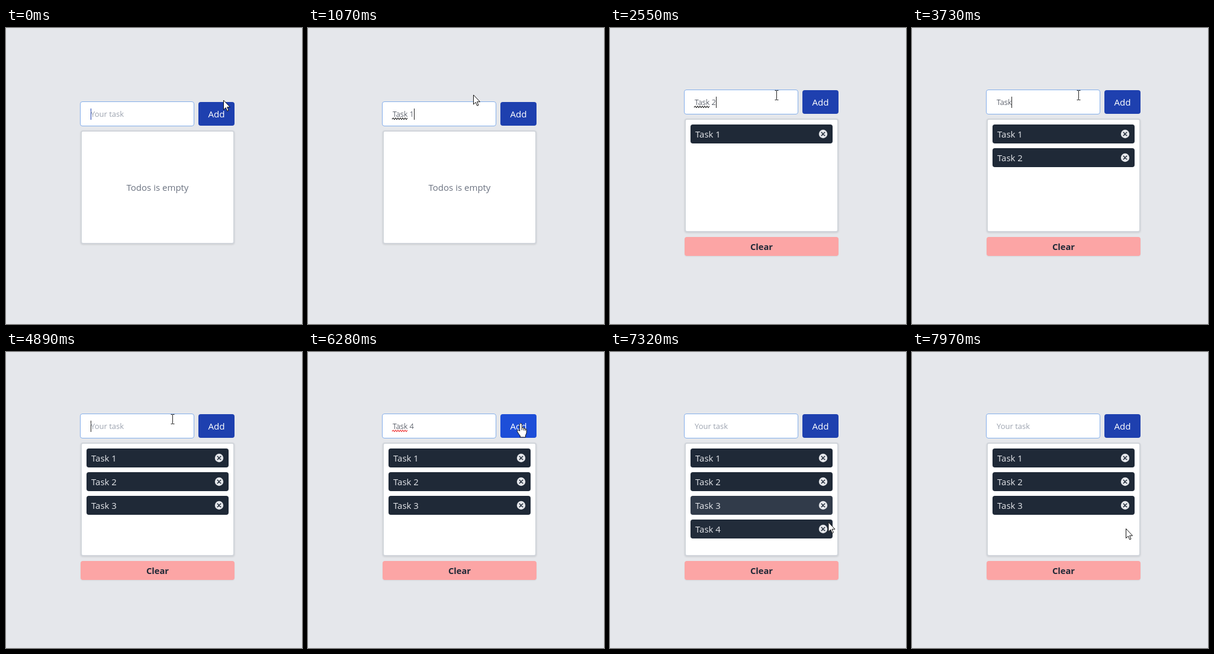
Write an HTML page that moves like this. It is 500 px wide and 500 px high and loops after 8 s.

```html
<!DOCTYPE html>
<html lang="en">
<head>
<meta charset="utf-8">
<title>Todo list</title>
<style>
  html, body { margin: 0; width: 100%; height: 100%; overflow: hidden; background: #e5e7eb; }
  #stage { position: relative; width: 500px; height: 500px; overflow: hidden; font: 15px/32px "Open Sans", "Noto Sans", sans-serif; }
  #stage div, #stage svg { position: absolute; box-sizing: border-box; }
  #app { left: 126px; top: 125px; width: 260px; height: 280px; }
  #field { left: -1px; top: -1px; width: 193px; height: 42px; padding-left: 17px; display: flex; align-items: center;
    background: #fff; border: 1px solid #84aeea; border-radius: 4px; font-size: 13px; white-space: pre; }
  #typed { color: #111827; font-weight: 300; }
  #caret { width: 1px; height: 19px; margin-right: -1px; }
  #hint { color: #9ca3af; }
  #wave { left: 16px; top: 25px; overflow: visible; fill: none; stroke-width: 1.1; }
  #add { left: 199px; top: 0; width: 61px; height: 40px; line-height: 40px; border-radius: 4px;
    color: #fff; font-weight: 500; font-size: 15.2px; text-align: center; }
  #list { left: 0; top: 48px; width: 260px; height: 192px; background: #fff; border: 2px solid #d1d5db;
    border-radius: 4px; box-shadow: 0 1px 3px rgba(0, 0, 0, .12); }
  #empty { left: 0; right: 0; top: 78px; text-align: center; color: #6b7280; }
  .row { left: 8px; width: 240px; height: 32px; padding-left: 8px; border-radius: 4px; color: #e5e7eb; }
  .row svg { left: 215px; top: 7px; }
  #clear { left: 0; top: 248px; width: 260px; height: 32px; border-radius: 4px; background: #fca5a5; color: #1f2937;
    font-weight: 700; font-size: 14.7px; text-align: center; box-shadow: 0 1px 2px rgba(0, 0, 0, .08); }
  #pointer { left: 0; top: 0; overflow: visible; pointer-events: none; }
</style>
</head>
<body>
<div id="stage">
  <div id="app">
    <div id="field"><span id="typed"></span><span id="caret"></span><span id="hint">Your task</span></div>
    <svg id="wave" width="27" height="6"><path/></svg>
    <div id="add">Add</div>
    <div id="list"><div id="empty">Todos is empty</div></div>
    <div id="clear">Clear</div>
  </div>
  <svg id="pointer" width="1" height="1">
    <g id="arrow" fill="#fff" stroke="#111">
      <path d="M.5 .5V16.5L4.2 13L6.7 18.8L9 17.8L6.6 12.2H11.5Z"/>
    </g>
    <g id="beam" fill="none" stroke="#222">
      <path d="M-1 -7.5H1.5L2 -7L2.5 -7.5H5M2 -7V8M-1 8.5H1.5L2 8L2.5 8.5H5"/>
    </g>
    <g id="hand" fill="#fff" stroke="#111">
      <path d="M-2.3 13V1.8A1.8 1.8 0 0 1 1.3 1.8V7.5Q3.6 6.2 4.4 8.4Q6.4 7.6 7 9.5Q9.2 9 9.2 11.5V15Q9.2 18 7.4 20V23.5H-1.6V21Q-4.4 17.8 -6.3 14.2Q-7.2 11.6 -5.2 11.2Q-3.8 11.1 -2.3 13Z"/>
      <path d="M1.3 7.5V11.5M4.4 8.4V12M7 9.5V12.5" fill="none"/>
    </g>
  </svg>
</div>
<script>
const LOOP = 8000, BLINK = 515, EASE = 150;
const FIRST_ADD = 1530, BLUR = 6570, DELETE = 7760, GONE = 7950;

const keys = [
  [-200, ''], [430, 'T'], [490, 'Ta'], [550, 'Tas'], [880, 'Task'], [980, 'Task '], [1070, 'Task 1'],
  [1530, ''], [2020, 'T'], [2130, 'Ta'], [2220, 'Tas'], [2320, 'Task'], [2420, 'Task '], [2550, 'Task 2'],
  [2990, ''], [3350, 'T'], [3450, 'Ta'], [3550, 'Tas'], [3730, 'Task'], [3770, 'Task '], [3810, 'Task 3'],
  [3850, ''], [5020, 'T'], [5180, 'Ta'], [5250, 'Tas'], [5420, 'Task'], [5480, 'Task '], [5570, 'Task 4'],
  [BLUR, '']
];

// time, x, y of the pointer's hot spot
const path = [
  [30, 367, 121.5], [140, 345, 118], [260, 302, 114], [360, 279, 112.5],
  [5930, 279, 112.5], [5975, 300, 98], [6020, 340, 86], [6065, 386, 84], [6120, 378, 106],
  [6200, 366, 118], [6280, 360, 120.5], [6910, 360, 120.5],
  [7000, 364, 150], [7140, 368, 238], [7290, 368.5, 275], [7320, 368.5, 287],
  [7480, 364, 300], [7660, 361, 298]
];

const births = [[FIRST_ADD, 280], [2990, 100], [3850, 100], [BLUR, 180]];

const $ = id => document.getElementById(id);
const clamp = v => Math.max(0, Math.min(1, v));
const mix = (a, b, k) => `rgb(${a.map((v, i) => Math.round(v + (b[i] - v) * k))})`;
const inside = ([x, y], l, t, w, h) => x >= l && x < l + w && y >= t && y < t + h;

const rows = births.map((_, i) => {
  const row = document.createElement('div');
  row.className = 'row';
  row.style.top = 8 + 40 * i + 'px';
  row.innerHTML = `Task ${i + 1}<svg width="18" height="18"><circle cx="9" cy="9" r="7.2" fill="#e5e7eb"/>
    <path d="M6.2 6.2L11.8 11.8M11.8 6.2L6.2 11.8" stroke="#1f2937" stroke-width="1.5" stroke-linecap="round"/></svg>`;
  $('list').append(row);
  return row;
});

let zigzag = 'M0 4';
for (let x = 2; x <= 26; x += 2) zigzag += `L${x} ${x % 4 ? 2 : 4.5}`;
$('wave').firstChild.setAttribute('d', zigzag);

function pointerAt(t) {
  if (t <= path[0][0]) return path[0].slice(1);
  for (let i = 1; i < path.length; i++) {
    const [t1, x1, y1] = path[i], [t0, x0, y0] = path[i - 1];
    if (t < t1) {
      const k = (t - t0) / (t1 - t0);
      return [x0 + (x1 - x0) * k, y0 + (y1 - y0) * k];
    }
  }
  return path[path.length - 1].slice(1);
}

// Share of the last moments spent over a box, as a colour transition
function hover(t, ...box) {
  let hits = 0;
  for (let i = 0; i < 15; i++) hits += inside(pointerAt(t - i * EASE / 15), ...box);
  return hits / 15;
}

function drawField(t) {
  const [since, text] = keys.filter(k => k[0] <= t).pop();
  $('typed').textContent = text;
  $('hint').style.display = text ? 'none' : '';
  const lit = t < BLUR && (t - since) % (2 * BLINK) < BLINK;
  $('caret').style.background = !lit ? 'none' : t < 430 ? '#1e40af' : '#222';
  $('wave').style.display = text.length > 4 ? '' : 'none';
  $('wave').style.stroke = t > 5000 ? '#ef3333' : '#222';
}

function drawList(t, top) {
  rows.forEach((row, i) => {
    const [start, span] = births[i];
    let alpha = clamp((t - start) / span);
    if (i === 3) alpha *= 1 - clamp((t - DELETE) / (GONE - DELETE));
    row.style.opacity = alpha;
    row.style.background = mix([31, 41, 55], [55, 65, 81], hover(t, 136, 163 + 40 * i, 240, 32));
  });
  const filled = clamp((t - FIRST_ADD) / 280);
  $('empty').style.opacity = 1 - filled;
  $('clear').style.opacity = filled;
  $('add').style.background = mix([30, 64, 175], [29, 78, 216], hover(t, 325, top, 61, 40));
}

function drawPointer(t, top) {
  const spot = pointerAt(t);
  const onIcon = t > BLUR && t < GONE && Math.hypot(spot[0] - 360, spot[1] - 299) < 8;
  const kind = onIcon || inside(spot, 325, top, 61, 40) ? 'hand'
    : inside(spot, 126, top, 192, 40) ? 'beam' : 'arrow';
  for (const id of ['arrow', 'beam', 'hand']) $(id).style.display = id === kind ? '' : 'none';
  const shift = kind === 'beam' ? 0.5 : 0;
  $(kind).setAttribute('transform', `translate(${spot[0] + shift} ${spot[1] + shift})`);
}

function draw(t) {
  const top = t < FIRST_ADD ? 125 : 105;
  $('app').style.top = top + 'px';
  drawField(t);
  drawList(t, top);
  drawPointer(t, top);
}

const begin = performance.now();
function tick() {
  draw((performance.now() - begin) % LOOP);
  requestAnimationFrame(tick);
}
tick();
</script>
</body>
</html>
```
